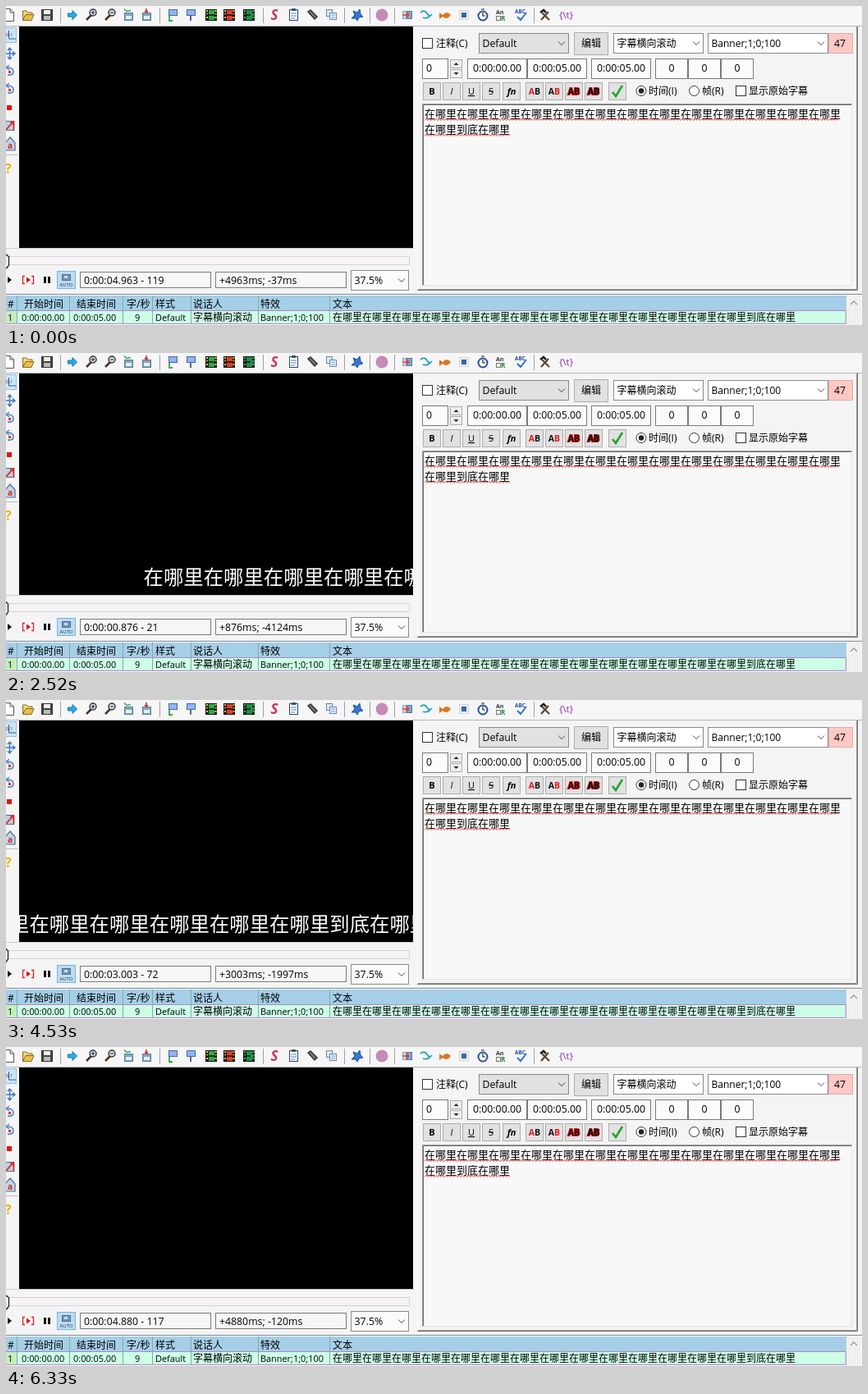
Recreate the animation shown at these times as an HTML page. Size 1043x389 px, loop 6390 ms.

```html
<!DOCTYPE html>
<html lang="zh">
<head>
<meta charset="utf-8">
<style>
html, body { margin: 0; width: 100%; height: 100%; overflow: hidden; background: #f4f4f4; }
svg { display: block; }
text { font-family: "Open Sans", "Noto Sans CJK SC", "Noto Sans CJK", sans-serif; white-space: pre; }
</style>
</head>
<body>
<script>
const LOOP = 6390;
const PHRASE = '在哪里';
const TAIL = '到底' + PHRASE;
const LINE = PHRASE.repeat(14) + TAIL;

let out = '';
const rect = (x, y, w, h, fill, stroke, extra = '') => {
  const o = stroke ? .5 : 0;
  out += `<rect x="${x + o}" y="${y + o}" width="${w - 2 * o}" height="${h - 2 * o}" fill="${fill}" stroke="${stroke || 'none'}" ${extra}/>`;
};
const path = (d, stroke, width = 1, fill = 'none', extra = '') => {
  out += `<path d="${d}" stroke="${stroke}" stroke-width="${width}" fill="${fill}" ${extra}/>`;
};
const fillPath = (d, fill, extra) => path(d, 'none', 0, fill, extra);
const disc = (x, y, r, fill, stroke = 'none', width = 1) => {
  out += `<circle cx="${x}" cy="${y}" r="${r}" fill="${fill}" stroke="${stroke}" stroke-width="${width}"/>`;
};
const text = (x, y, s, size = 12, fill = '#000', extra = '') => {
  out += `<text x="${x}" y="${y}" font-size="${size}" fill="${fill}" ${extra}>${s}</text>`;
};
const mid = 'text-anchor="middle"';
const bold = 'font-weight="700"';
const field = (x, y, w, h, s, fill = '#fbfbfb', extra = '') => {
  rect(x, y, w, h, fill, '#7a7a7a', extra);
  text(x + 5, y + h / 2 + 4.5, s, 12.3);
};
const box = (x, w, s) => {
  rect(x, 64, w, 25, '#fbfbfb', '#7a7a7a');
  text(x + w / 2, 80, s, 12.3, '#000', mid);
};
const combo = (x, y, w, h, s, fill = '#fff', size = 12) => {
  rect(x, y, w, h, fill, '#8a8a8a');
  text(x + 4.5, y + h / 2 + 4, s, size);
  path(`M${x + w - 13} ${y + h / 2 - 2}l4 4 4-4`, '#444');
};
const button = (x, y, w, h) => rect(x, y, w, h, '#e1e1e1', '#adadad');

function toolbar() {
  rect(0, 0, 1043, 24, '#f6f6f6');
  path('M0 24.5H1043', '#b4b4b4');
  for (const x of [66, 187, 313, 412, 443, 473, 643]) path(`M${x + .5} 2V21`, '#a0a0a0');
  // file icons
  path('M-2 3.5H5L9.500 8V18.500H-2M5 3.500V8H9.500', '#555', 1, '#fff');
  path('M20.500 17V6H25L27 8H32V11', '#8a6a20', 1, '#f4d680');
  path('M20.500 17.500L24 10.500H34L31 17.500Z', '#8a6a20', 1, '#e8bd50');
  rect(43, 4, 14, 14, '#444', '#333');
  rect(46, 5, 8, 5, '#eee');
  rect(46, 12, 8, 5, '#bbb');
  // jump and zoom
  path('M75.500 9H81V5.500L86.500 11 81 16.500V13H75.500Z', '#1674ad', 1, '#25aee8');
  for (const x of [104, 127]) {
    path(`M${x - 6} 17L${x} 11`, '#503020', 2.5);
    disc(x + 2, 8, 4, '#cfd9e6', '#333', 1.4);
    path(`M${x} 8h4` + (x < 110 ? 'm-2-2v4' : ''), '#222');
  }
  // video stepping
  for (const x of [149, 171]) {
    rect(x - 5, 8, 11, 10, '#7fa6c0', '#5a7f98');
    rect(x - 3, 12, 7, 4, '#e4eef4');
    path(x < 160 ? 'M144 3.500l3 3 5-1' : 'M171 3v5m-2-2l2 2 2-2', x < 160 ? '#38a455' : '#c33', 1.6);
  }
  for (const x of [203, 225]) {
    rect(x - 5, 4, 11, 8, '#8fb5ee', '#4867a8');
    path(x < 210 ? 'M199 12v6h4' : 'M225 12v6', x < 210 ? '#3aa34b' : '#557', 1.8);
  }
  // film strips
  for (const [x, side, c] of [[250, '#e8d43a', '#2fa84a'], [272, '#f2b53c', '#d8402c'], [296, '#35c060', '#1f9048']]) {
    rect(x - 7, 4, 14, 14, '#111');
    rect(x - 3, 5, 7, 12, c);
    path(`M${x - 5} 5v12M${x + 5.500} 5v12`, side, 2, 'none', 'stroke-dasharray="2 2"');
    path(`M${x - 7} 11h14`, '#111', 1.5);
  }
  fillPath('M298 7l5 4-5 4z', '#24904b');
  // subtitle tools
  text(327, 17, 'S', 17, '#c33a5c', mid + ' font-style="italic" ' + bold);
  rect(345, 4, 11, 14, '#fff', '#29436b');
  rect(348, 3, 5, 3, '#456');
  path('M347 9h7m-7 3h7m-7 3h5', '#4a80c0');
  path('M368 7l3-2 8 8-3 3z', '#333', 1.5, '#777');
  rect(390, 4, 8, 9, '#dce9f6', '#6a86a8');
  rect(394, 8, 9, 9, '#eef4fb', '#6a86a8');
  path('M396 11h5m-5 3h5', '#5a94cf');
  path('M421 15l4-4-2-5 5 2 3-4 1 6 3 3-5 1-2 4-2-3z', '#1c4f9c', 1, '#3876cf');
  disc(458, 11, 7.5, '#c48bb5');
  // timing and review
  rect(483, 6, 5, 10, '#c9d6e2', '#8fa3b5');
  rect(488, 6, 7, 10, '#7ea8d0', '#4c779f');
  path('M483 11h8m-3-3l3 3-3 3', '#d94a38', 1.5);
  path('M505 8q5-4 8 1t6 1M508 14q5 2 9-2', '#28a3bd', 1.8);
  fillPath('M528 8l4 3q5-6 10 0-5 7-10 2l-4 3z', '#dc7527');
  rect(552, 5, 12, 12, '#e6ecf2', '#c3ced8', 'stroke-dasharray="2 1"');
  rect(555, 8, 6, 6, '#3f6597');
  disc(581, 12, 5.5, '#fff', '#274f9c', 2);
  path('M581 8v4h3M579 4h4', '#222', 1.2);
  text(597, 10, 'An', 7, '#333', bold);
  text(603, 18, 'R', 8, '#28842e', bold);
  rect(597, 12, 6, 6, '#eee', '#777');
  text(620, 9, 'ABC', 6.500, '#234fac', bold);
  path('M623 13l4 4 7-9', '#2a70d4', 2);
  path('M652 17l9-10M653 8l9 9', '#5b4634', 2.2);
  path('M651 8l4-3 3 3', '#222', 2.5);
  text(674, 15, '{\\t}', 11.500, '#8a23b5');
}

function sideTools() {
  rect(-1, 26, 14, 19, '#cce4f7', '#8fbfe6');
  path('M3.500 30V40H12', '#335d8c');
  text(0, 37, '0.1', 6, '#345');
  path('M-1 58H10M4.500 52V64M2 54l2.500-3L7 54M2 62l2.500 3L7 62M8 55.500l3 2.500-3 2.500', '#3978c5', 1.4);
  for (const y of [79, 101]) {
    path(`M1 ${y - 4}q8 0 8 5t-7 4`, '#4a86ca', 1.6);
    path(`M4 ${y - 7}l-4 3 4 3`, '#4a86ca', 1.4);
    rect(3, y, 3, 3, '#d33');
  }
  rect(1, 121, 6, 6, '#e31414');
  rect(-1, 140, 11, 12, '#b9cde4', '#4a6f9c');
  path('M0 151L8 142M5 142h4v4M9.500 140v12', '#d22', 1.6);
  path('M-1 167L5 160 11 167V176H-1', '#4a6f9c', 1.2, '#c6d4e4');
  text(2, 174, 'a', 10, '#d22', bold);
  path('M0 181.500H14', '#bbb');
  text(-1, 204, '?', 16, '#eeb000', bold);
}

function videoPanel() {
  rect(16, 25, 480, 270, '#000');
  out += `<g clip-path="url(#screen)"><text id="banner" y="281.500" font-size="24.400" fill="#fff">${LINE}</text></g>`;
  path('M0 295.500H497', '#ccc');
  path('M0 305.500H491.500V315.500H0', '#d6d2d6', 1, '#f6f4f6');
  out += '<g id="thumb">';
  path('M-4 303.500H1L3.500 306V316L1 319.500H-4', '#222', 1.3, '#f4f4f4');
  out += '</g>';
  rect(16, 323, 23, 22, '#d4e8f8', '', 'id="hover"');
  fillPath('M2 330l5 4-5 4z', '#111');
  path('M23 329.500h-2.500v9H23M31 329.500h2.500v9H31', '#d22', 1.3);
  fillPath('M25 330.500l5 3.500-5 3.500z', '#d11');
  rect(46, 330, 3, 8, '#111');
  rect(51, 330, 3, 8, '#111');
  rect(62, 323, 23, 22, '#bcdcf4', '#78b2e0');
  rect(68, 327, 11, 8, '#7395b5', '#4a6d90');
  rect(71, 329, 4, 3, '#c8dcec');
  text(73.500, 342, 'AUTO', 6, '#234', mid);
  field(90, 324, 160, 20, '<tspan id="clock"></tspan>', '#f7f7f7', 'id="clockBox"');
  field(255, 324, 160, 20, '<tspan id="offset"></tspan>', '#f7f7f7');
  combo(420, 322, 71, 25, '37.5%', '#fbfbfb', 12.4);
}

function editPanel() {
  path('M501.500 346V25', '#fff');
  path('M502 345.500H1036.500V25', '#a0a0a0');
  path('M501 346.500H1037.500V25', '#696969');
  const check = (x, y) => rect(x, y, 13, 13, '#fff', '#333');
  check(507, 39);
  text(524, 50, '注释(C)');
  combo(576, 33, 110, 25, 'Default', '#e1e1e1', 12.3);
  button(692, 32, 42, 28);
  text(713, 50, '编辑', 12, '#000', mid);
  combo(740, 33, 110, 25, '字幕横向滚动');
  combo(855, 33, 147, 25, 'Banner;1;0;100');
  rect(1002, 33, 30, 25, '#ffc8c4', '#d8b0ac');
  text(1016, 50, '47', 12.300, '#000', mid);

  rect(507, 64, 32, 25, '#fbfbfb', '#7a7a7a');
  text(512, 80, '0', 12.3);
  for (const [y, d] of [[65, 'M545.500 72h6l-3-3z'], [77, 'M545.500 81h6l-3 3z']]) {
    rect(541, y, 15, 11, '#eee', '#adadad');
    fillPath(d, '#222');
  }
  box(562, 73, '0:00:00.00');
  box(635, 73, '0:00:05.00');
  box(713, 73, '0:00:05.00');
  for (const x of [791, 831, 871]) box(x, 40, '0');

  const styles = [['B', bold], ['I', 'font-style="italic"'], ['U', 'text-decoration="underline"'],
    ['S', 'text-decoration="line-through"'], ['fn', 'font-style="italic" ' + bold]];
  styles.forEach(([s, extra], i) => {
    const x = 508 + i * 24.300 | 0;
    button(x, 93, 22, 22);
    text(x + 11, 108, s, 11, '#000', mid + ' ' + extra);
  });
  const red = '#e01818', ink = '#111';
  [[red, ink], [ink, red], [ink, ink], [ink, ink]].forEach(([a, b], i) => {
    const x = 633 + i * 24;
    button(x, 93, 22, 22);
    const glow = i > 1 ? `stroke="${i > 2 ? '#b01010' : red}" stroke-width="2" paint-order="stroke"` : '';
    text(x + 11, 108, `<tspan fill="${a}">A</tspan><tspan fill="${b}">B</tspan>`, 10.500, ink, `${mid} ${bold} ${glow}`);
  });
  button(734, 93, 22, 22);
  path('M739 105l4 5 8-13', '#22a52b', 2.6);
  disc(774, 103.500, 6, '#fff', '#333');
  disc(774, 103.500, 3.2, '#222');
  text(783, 108, '时间(I)');
  disc(838.500, 103.500, 6, '#fff', '#333');
  text(848, 108, '帧(R)');
  check(889, 97);
  text(905, 108, '显示原始字幕');

  rect(507, 119, 524, 222, '#f8f8f8', '#e3e3e3');
  path('M507.500 341V119.500H1031', '#a0a0a0');
  path('M508.500 340V120.500H1030', '#696969');
  const squiggle = (y, w) => path(`M510 ${y}` + 'l2-2 2 2'.repeat(w / 4), '#e02020', .9);
  text(510, 136, LINE.slice(0, 39), 13);
  text(510, 155, LINE.slice(39), 13);
  squiggle(139.500, 507);
  squiggle(158.500, 104);
  rect(510, 122, 1, 17, '#000', '', 'id="caret"');
}

function grid() {
  rect(0, 352, 1043, 37, '#fff');
  path('M0 351.500H1043', '#7d8790');
  rect(0, 353, 1024, 18, '#a5cfe7');
  rect(0, 372, 1024, 16, '#ccffe6');
  rect(0, 372, 13, 16, '#c3eebb');
  rect(1024, 353, 18, 36, '#f0f0f0');
  path('M1029 364l4-4 4 4', '#999', 1.3);
  path([13, 77, 142, 178, 225, 307, 394].map(x => `M${x + .5} 353V388`).join(''), '#83aaa9');
  path('M0 371.500H1023.500V387.500H0', '#b583c4');
  const cells = [[2, '#', '1'], [22, '开始时间', '0:00:00.00', 19], [86, '结束时间', '0:00:05.00', 82],
    [147, '字/秒', '9', 157], [182, '样式', 'Default'], [228, '说话人', '字幕横向滚动'],
    [310, '特效', 'Banner;1;0;100'], [398, '文本', LINE]];
  for (const [x, head, value, vx = x] of cells) {
    text(x, 367.5, head);
    text(vx, 384, value, /[^\x00-\x7f]/.test(value) ? 12 : 10.9);
  }
}

toolbar();
sideTools();
videoPanel();
editPanel();
grid();
document.body.innerHTML = `<svg width="1043" height="389" viewBox="0 0 1043 389">
<defs><clipPath id="screen"><rect x="16" y="25" width="480" height="270"/></clipPath></defs>${out}</svg>`;

const $ = id => document.getElementById(id);
const [banner, thumb, hover, clock, clockBox, offset, caret] =
  ['banner', 'thumb', 'hover', 'clock', 'clockBox', 'offset', 'caret'].map($);
const clamp = v => Math.max(0, Math.min(1, v));
const START = 1590, FPS = 24000 / 1001;

function draw(now) {
  const t = Math.floor(now % LOOP / 30) * 30;
  const playing = t >= START;
  const frame = playing ? Math.max(0, Math.floor(8.42 + .02505 * (t - 1980))) : 119;
  const ms = Math.round(frame * 1000 / FPS);
  const left = ms - 5000;
  clock.textContent = `0:00:0${(ms / 1000).toFixed(3)} - ${frame}`;
  offset.textContent = `+${ms}ms; ${left}ms`;
  banner.setAttribute('x', 496 - .375 * ms);
  thumb.setAttribute('transform', `translate(${frame < 84 ? -1 : 0})`);
  hover.setAttribute('opacity', clamp((t - 1080) / 210) * clamp((2190 - t) / 150));
  clockBox.setAttribute('stroke', t >= 870 && t < 1440 ? '#333' : '#7a7a7a');
  caret.setAttribute('opacity', playing && (t - START) % 1050 < 525 ? 1 : 0);
}

const begin = performance.now();
function tick() {
  draw(performance.now() - begin);
  requestAnimationFrame(tick);
}
tick();
</script>
</body>
</html>
```
